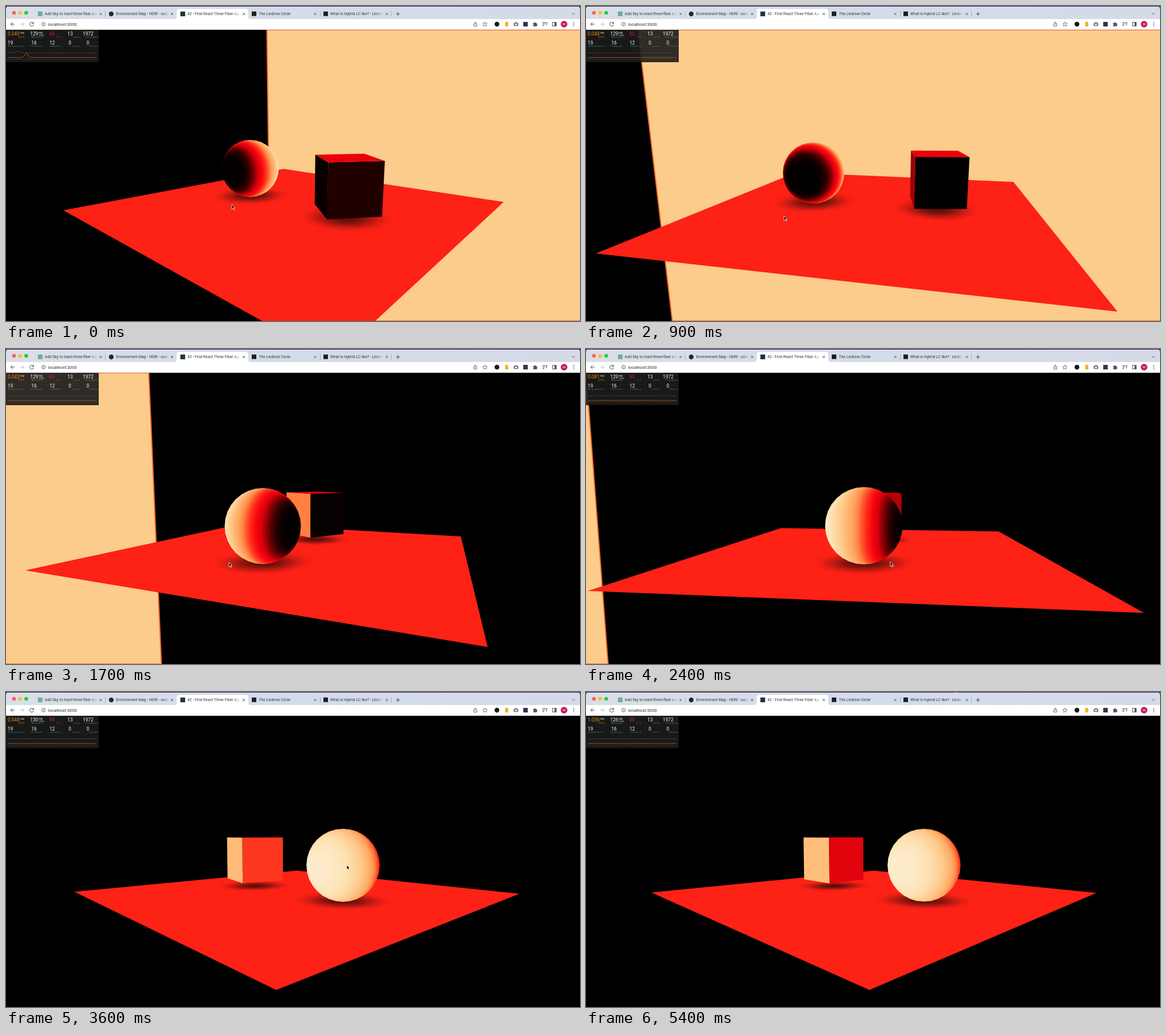
These frames come from a looping animation (1009x555 px, 5.5 s). An HTML page with a canvas:

```html
<!DOCTYPE html>
<html lang="en">
<head>
<meta charset="utf-8">
<title>First React Three Fiber App</title>
<style>
html, body { margin: 0; width: 100%; height: 100%; overflow: hidden; background: #000; }
#stage { position: relative; width: 1009px; height: 555px; overflow: hidden; }
canvas, svg { position: absolute; left: 0; top: 0; }
.tab { position: absolute; top: 8px; width: 93px; height: 12px; overflow: hidden; white-space: nowrap;
  font: 6.75px/12px Roboto, Inter, sans-serif; color: #33363b;
  -webkit-mask-image: linear-gradient(90deg, #000 86%, transparent);
  mask-image: linear-gradient(90deg, #000 86%, transparent); }
.num { font: 8.3px Roboto, sans-serif; fill: #f4f4f4; }
.unit { font: 5.2px Roboto, sans-serif; fill: #f4f4f4; }
.label { font: 4.3px Roboto, sans-serif; letter-spacing: .75px; text-anchor: end; }
</style>
</head>
<body>
<div id="stage">
  <canvas id="scene" width="1009" height="555"></canvas>
  <svg id="ui" width="1009" height="555" viewBox="0 0 1009 555">
    <defs>
      <linearGradient id="strip">
        <stop offset="0" stop-color="#d9dfe6"/><stop offset=".5" stop-color="#d3dcea"/><stop offset="1" stop-color="#d6dae8"/>
      </linearGradient>
    </defs>
    <rect width="1009" height="24" fill="url(#strip)"/>
    <rect width="1009" height="1" fill="#33205f"/>
    <path d="M0 0h5Q0 0 0 6zM1009 0h-5q5 0 5 6z" fill="#33205f"/>
    <rect y="23" width="1009" height="19" fill="#fff"/>
    <path d="M296 23q4 0 4-4V10q0-5 5-5H421q5 0 5 5v9q0 4 4 4z" fill="#fff"/>
    <rect y="41" width="1009" height="1" fill="#d9dce0"/>
    <g><circle cx="14" cy="12" r="3.3" fill="#fe5f57"/><circle cx="25" cy="12" r="3.3" fill="#febc2e"/><circle cx="35.5" cy="12" r="3.3" fill="#28c840"/></g>
    <g id="icons">
      <rect x="56" y="9.7" width="8.2" height="8.2" fill="#74aa9c"/>
      <circle cx="185" cy="14" r="4.2" fill="#24292f"/>
      <rect x="306.5" y="9.7" width="8.4" height="8.4" fill="#20343f"/>
      <rect x="432" y="9.7" width="8" height="8" fill="#1d1f1d"/>
      <rect x="558" y="9.7" width="8" height="8" fill="#1d1f1d"/>
    </g>
    <path id="crosses" fill="none" stroke="#4a4d52" stroke-width=".9"/>
    <path d="M174.5 9v10M552.5 9v10M677.5 9v10" stroke="#9aa2b0" stroke-width=".8"/>
    <g fill="none" stroke="#45484d" stroke-width="1">
      <path d="M685.5 14h7M689 10.5v7M995 12.5l2.4 2.4 2.4-2.4"/>
      <path d="M15 32H8.5M11.5 28.8L8.3 32l3.2 3.2"/>
      <path d="M25 32h6.5M28.5 28.8l3.2 3.2-3.2 3.2" stroke="#b9bcc1"/>
      <path d="M48 30.2a3.4 3.4 0 1 0 .5 2.6M48.5 28.2v2.6h-2.6"/>
      <circle cx="66" cy="32" r="3.2" stroke-width=".8"/><path d="M66 31.4v2.2M66 29.8v.8" stroke-width=".9"/>
      <path d="M823.4 30.8h-1v4.6h5.2v-4.6h-1M825 33.4v-5.2M823.3 29.8l1.7-1.7 1.7 1.7" stroke-width=".8"/>
      <path d="M842 28l1.1 2.7 2.9.2-2.2 1.8.7 2.9-2.5-1.6-2.5 1.6.7-2.9-2.2-1.8 2.9-.2z" stroke-width=".7"/>
      <path d="M943 29.5h6M943 32h4M943 34.5h3" /><path d="M950.2 29v5.2M950 29.4h1.8"/>
      <rect x="960.8" y="28.8" width="6.4" height="6.4"/><path d="M965.6 29v6" stroke-width="2.6"/>
    </g>
    <circle cx="863" cy="32" r="4.2" fill="#17181a"/>
    <rect x="877.4" y="28" width="5.4" height="8" fill="#f0b323"/>
    <g fill="#777b80"><rect x="892.4" y="29.6" width="8" height="5.6" rx="1"/><rect x="894.6" y="28.4" width="3.6" height="2"/></g>
    <circle cx="896.4" cy="32.3" r="1.6" fill="#fff"/>
    <rect x="909.2" y="28" width="8" height="8" fill="#35324f"/>
    <path d="M926.6 30h2.2a1.2 1.2 0 0 1 2.4 0h2v2.2a1.2 1.2 0 0 1 0 2.3v1.3h-6.6v-1.7a1.1 1.1 0 0 0 0-2.2z" fill="#505358"/>
    <circle cx="981" cy="32" r="5.8" fill="#c2185b"/>
    <text x="981" y="34.3" text-anchor="middle" font-family="Roboto, sans-serif" font-size="6.2" fill="#fff">W</text>
    <g fill="#45484d"><circle cx="998" cy="29.2" r=".85"/><circle cx="998" cy="32" r=".85"/><circle cx="998" cy="34.8" r=".85"/></g>
    <text x="74" y="34.7" font-family="Roboto, Inter, sans-serif" font-size="7.7" fill="#2c2f33">localhost:3000</text>

    <rect y="42" width="163" height="57" fill="rgb(28,28,27)" fill-opacity=".91"/>
    <g id="stats">
      <text class="unit" x="25" y="48.6">ms</text><text class="unit" x="57" y="48.6">mb</text>
      <text x="57" y="52.6" font-family="Roboto, sans-serif" font-size="3.8" fill="#ccc">/4096</text>
    </g>
    <g fill="none" stroke-width=".8">
      <path id="fpsLine" stroke="#4a3a78"/>
      <path id="gpuLine" stroke="#b86a1c"/>
      <path d="M3 93.8H160" stroke="#45442c" stroke-width=".6"/>
    </g>
    <path id="cursor" d="M0 0v7.8l1.9-1.7 1.3 3 1.3-.6-1.3-2.9h2.4z" fill="#000" stroke="#fff" stroke-width=".8"/>
  </svg>
</div>
<script>
const $ = id => document.getElementById(id);
const ctx = $('scene').getContext('2d', { willReadFrequently: true });
const W = 1009, H = 555, TOP = 42, LOOP = 5500, RAD = Math.PI / 180;
const CX = W / 2, CY = (TOP + H) / 2, FOCAL = (H - TOP) / 2 / Math.tan(22.5 * RAD), DIST = 11.12;

// Browser tabs
[[68, 'Add Sky to react-three-fiber scene'], [193.5, 'Environment Map - HDRI - oaks'],
 [319, '42 - First React Three Fiber App'], [444.5, 'The Lindrow Circle'],
 [570, 'What is Hybrid LC like? - Lindrow']].forEach(([x, title]) => {
  const tab = document.createElement('div');
  tab.className = 'tab';
  tab.style.left = x + 'px';
  tab.textContent = title;
  $('stage').append(tab);
});
$('crosses').setAttribute('d', [166.5, 292, 418, 543.5, 669.5]
  .map(x => `M${x - 2} 12l4 4M${x + 2} 12l-4 4`).join(''));

// Performance panel
function addText(cls, x, y, value, fill) {
  const el = document.createElementNS('http://www.w3.org/2000/svg', 'text');
  el.setAttribute('class', cls);
  el.setAttribute('x', x);
  el.setAttribute('y', y);
  if (fill) el.style.fill = fill;
  el.textContent = value;
  $('stats').append(el);
  return el;
}
const GREEN = '#45a86a', TEAL = '#3f9f93', ORANGE = '#e58a22', PINK = '#c81f58';
const gpuText = addText('num', 3, 52.4, '', ORANGE);
const memText = addText('num', 42.5, 52.4, '');
[[76, 52.4, '60', PINK], [108, 52.4, '13'], [135, 52.4, '1972'], [3, 68, '19'], [44.5, 68, '16'],
 [76.5, 68, '12'], [110, 68, '0'], [141.5, 68, '0']].forEach(([x, y, v, c]) => addText('num', x, y, v, c));
[[33, 56.4, 'GPU', ORANGE], [65, 56.4, 'Memory', GREEN], [98, 56.4, 'FPS', PINK], [130.5, 56.4, 'calls', TEAL],
 [163, 56.4, 'Triangles', TEAL], [33, 72, 'Geometries', TEAL], [65, 72, 'Textures', TEAL],
 [98, 72, 'shaders', TEAL], [130.5, 72, 'Lines', TEAL], [163, 72, 'Points', TEAL]]
  .forEach(([x, y, v, c]) => addText('label', x, y, v, c));

const gpuSteps = [[0, '0.049'], [.7, '0.048'], [1.3, '0.043'], [2, '0.081'], [3, '0.048'], [4, '0.050'], [5, '1.056']];
const memSteps = [[0, 129], [3, 130], [4, 126]];
const held = (steps, t) => steps.filter(s => s[0] <= t).pop()[1];

function graph(base, peak, t, amp) {
  let d = '';
  for (let x = 3; x <= 160; x += 1.5) {
    const u = x - peak + 60 * t, wob = .25 * Math.sin((x + 60 * t) * .35);
    d += `${d ? 'L' : 'M'}${x} ${(base + wob - amp * Math.exp(-u * u / 14)).toFixed(2)}`;
  }
  return d;
}

// Monotone cubic through [time, value] knots
function spline(k) {
  const slope = k.slice(1).map((p, i) => (p[1] - k[i][1]) / (p[0] - k[i][0]));
  const tan = k.map((p, i) => {
    const a = slope[i - 1], b = slope[i];
    return a * b > 0 ? 2 * a * b / (a + b) : 0;
  });
  return t => {
    if (t >= k[k.length - 1][0]) return k[k.length - 1][1];
    let i = 0;
    while (t >= k[i + 1][0]) i++;
    const h = k[i + 1][0] - k[i][0], u = (t - k[i][0]) / h, w = 1 - u;
    return w * w * (1 + 2 * u) * k[i][1] + u * u * (3 - 2 * u) * k[i + 1][1]
      + h * u * w * (w * tan[i] - u * tan[i + 1]);
  };
}
const azimuth = spline([[0, 41], [.3, 30], [.6, 16], [.9, 12.8], [1, 5], [1.2, -33], [1.45, -56], [1.7, -66.5],
  [2, -68.5], [2.2, -73], [2.4, -83.2], [2.7, -102], [3, -117], [3.3, -129.5], [3.6, -133.4], [4, -134.3],
  [4.4, -134.5], [5.4, -134.65]]);
const elevation = spline([[0, 10.8], [.9, 10.8], [1.7, 6.3], [2.4, 5.5], [3.6, 4.2], [5.4, 4.2]]);
const mouseX = spline([[0, 397], [.45, 437], [.9, 348], [1.4, 466], [1.7, 392], [2.1, 500], [2.4, 535], [3, 598], [3.6, 599], [4.2, 640], [4.4, 650], [5.4, 648]]);
const mouseY = spline([[0, 350], [.9, 370], [1.7, 376], [2.4, 375], [3, 372], [3.6, 305], [4.2, -14], [4.4, -14], [5.4, -7.5]]);

// Colour by how far a normal faces the light: [amount, r, g, b]
const SPHERE = [[-1, 0, 0, 0], [-.82, 8, 0, 0], [-.7, 50, 0, 0], [-.57, 130, 0, 4], [-.45, 216, 0, 12], [-.33, 248, 4, 15],
  [-.2, 255, 42, 24], [-.08, 255, 92, 48], [0, 255, 132, 70], [.15, 255, 168, 98], [.4, 254, 199, 135], [.7, 253, 224, 176], [1, 253, 236, 204]];
const CUBE = [[-1, 0, 0, 0], [-.75, 9, 0, 0], [-.64, 34, 0, 0], [-.5, 62, 0, 0], [-.19, 160, 0, 6], [0, 226, 0, 12],
  [.25, 255, 58, 32], [.55, 255, 130, 66], [.85, 255, 173, 104], [1, 255, 190, 122]];
function ramp(stops, m) {
  m = Math.max(-1, Math.min(.9999, m));
  let i = 0;
  while (m >= stops[i + 1][0]) i++;
  const a = stops[i], b = stops[i + 1], u = (m - a[0]) / (b[0] - a[0]);
  return [1, 2, 3].map(c => a[c] + (b[c] - a[c]) * u);
}
const shades = Array.from({ length: 512 }, (_, i) => ramp(SPHERE, i / 255.5 - 1));

let sa, ca, se, ce;
// World direction to camera axes: right, up, depth
function turn(x, y, z) {
  const q = x * sa + z * ca;
  return [x * ca - z * sa, y * ce - q * se, -q * ce - y * se];
}
function view(x, y, z) {
  const v = turn(x, y, z);
  v[2] += DIST;
  return v;
}
const screen = v => [CX + FOCAL * v[0] / v[2], CY - FOCAL * v[1] / v[2]];
const project = (x, y, z) => screen(view(x, y, z));

function trace(points) {
  ctx.beginPath();
  points.forEach(p => ctx.lineTo(p[0], p[1]));
  ctx.closePath();
}
function fill(points, color) {
  trace(points);
  ctx.fillStyle = color;
  ctx.fill();
}

// Screen x where a vertical edge of the bright sky face crosses height y
function edgeX(side, y) {
  const p = side * ca + sa, q = side * sa - ca, k = (CY - y) / FOCAL;
  if (q > -.05) return -1e4;
  const t = q * (se - k * ce) / (ce + k * se);
  return CX + FOCAL * p / (-q * ce - t * se);
}
function drawSky() {
  const face = [[edgeX(-1, TOP), TOP], [edgeX(1, TOP), TOP], [edgeX(1, H), H], [edgeX(-1, H), H]];
  fill(face, '#fbcc8b');
  ctx.strokeStyle = '#f8682f';
  ctx.lineWidth = 2;
  ctx.stroke();
}

function drawShadow(x, radius, dark) {
  const y = -.99, o = project(x, y, 0);
  const px = project(x + .5, y, 0), mx = project(x - .5, y, 0), pz = project(x, y, .5), mz = project(x, y, -.5);
  ctx.save();
  ctx.transform(px[0] - mx[0], px[1] - mx[1], pz[0] - mz[0], pz[1] - mz[1], o[0], o[1]);
  const g = ctx.createRadialGradient(0, 0, 0, 0, 0, radius);
  for (let i = 0; i <= 8; i++) {
    const u = i / 8, a = dark * (1 - u * u * (3 - 2 * u));
    g.addColorStop(u, `rgba(30,8,6,${a.toFixed(3)})`);
  }
  ctx.fillStyle = g;
  ctx.beginPath();
  ctx.arc(0, 0, radius, 0, 7);
  ctx.fill();
  ctx.restore();
}

const SIZE = 160, ball = document.createElement('canvas');
ball.width = ball.height = SIZE;
const ballCtx = ball.getContext('2d'), pixels = ballCtx.createImageData(SIZE, SIZE);
function drawSphere() {
  const [cx, cy, cz] = view(-2, 0, 0), light = turn(0, 0, -1), mid = screen([cx, cy, cz]);
  const x0 = Math.round(mid[0]) - SIZE / 2, y0 = Math.round(mid[1]) - SIZE / 2;
  const cc = cx * cx + cy * cy + cz * cz - 1;
  for (let j = 0, o = 0; j < SIZE; j++) for (let i = 0; i < SIZE; i++, o += 4) {
    let dx = (x0 + i + .5 - CX) / FOCAL, dy = (CY - y0 - j - .5) / FOCAL, dz = 1 / Math.hypot(dx, dy, 1);
    dx *= dz; dy *= dz;
    const b = dx * cx + dy * cy + dz * cz, t = b - Math.sqrt(Math.max(0, b * b - cc));
    const nx = t * dx - cx, ny = t * dy - cy, nz = t * dz - cz, len = Math.hypot(nx, ny, nz);
    const rim = 1 + (nx * dx + ny * dy + nz * dz) / len;
    const m = (nx * light[0] + ny * light[1] + nz * light[2]) / len + .15 * rim * rim;
    const c = shades[Math.max(0, Math.min(511, Math.round((m + 1) * 255.5)))];
    pixels.data[o] = c[0]; pixels.data[o + 1] = c[1]; pixels.data[o + 2] = c[2]; pixels.data[o + 3] = 255;
  }
  ballCtx.putImageData(pixels, 0, 0);
  ctx.save();
  trace(Array.from({ length: 32 }, (_, i) => {
    const a = i * Math.PI / 16;
    return screen([cx + 1.006 * Math.cos(a), cy + 1.006 * Math.sin(a), cz]);
  }));
  ctx.clip();
  ctx.drawImage(ball, x0, y0);
  ctx.restore();
}

function drawCube(t) {
  const h = .75, r = h * Math.SQRT2, spin = 4.9 * RAD + t;
  const eye = [DIST * ce * sa, DIST * se, DIST * ce * ca];
  const corner = (i, y) => [2 + r * Math.sin(spin + i * Math.PI / 2), y, r * Math.cos(spin + i * Math.PI / 2)];
  for (let i = 0; i < 4; i++) {
    const n = spin + (i + .5) * Math.PI / 2, nx = Math.sin(n), nz = Math.cos(n);
    if ((eye[0] - 2) * nx + eye[2] * nz <= h) continue;
    const quad = [corner(i, h), corner(i + 1, h), corner(i + 1, -h), corner(i, -h)].map(p => project(...p));
    fill(quad, `rgb(${ramp(CUBE, -nz).map(Math.round)})`);
  }
  if (eye[1] > h) fill([0, 1, 2, 3].map(i => project(...corner(i, h))), '#ea000d');
}

function draw(t) {
  const a = azimuth(t) * RAD, e = elevation(t) * RAD;
  sa = Math.sin(a); ca = Math.cos(a); se = Math.sin(e); ce = Math.cos(e);
  ctx.fillStyle = '#000';
  ctx.fillRect(0, 0, W, H);
  drawSky();
  fill([[-5, -5], [5, -5], [5, 5], [-5, 5]].map(([x, z]) => project(x, -1, z)), '#fd2116');
  drawShadow(-2, 1.4, .75);
  drawShadow(2, 1.35, .75);
  if (sa > 0) { drawSphere(); drawCube(t); } else { drawCube(t); drawSphere(); }

  gpuText.textContent = held(gpuSteps, t);
  memText.textContent = held(memSteps, t);
  $('fpsLine').setAttribute('d', graph(82.5, 20, t, 3));
  $('gpuLine').setAttribute('d', graph(90.7, 36, t, 7.5));
  $('cursor').setAttribute('transform', `translate(${mouseX(t).toFixed(1)} ${mouseY(t).toFixed(1)})`);
}

let last = -1;
const start = performance.now();
function tick() {
  const step = Math.floor((performance.now() - start) % LOOP / 100);
  if (step !== last) draw((last = step) / 10);
  requestAnimationFrame(tick);
}
tick();
</script>
</body>
</html>
```
